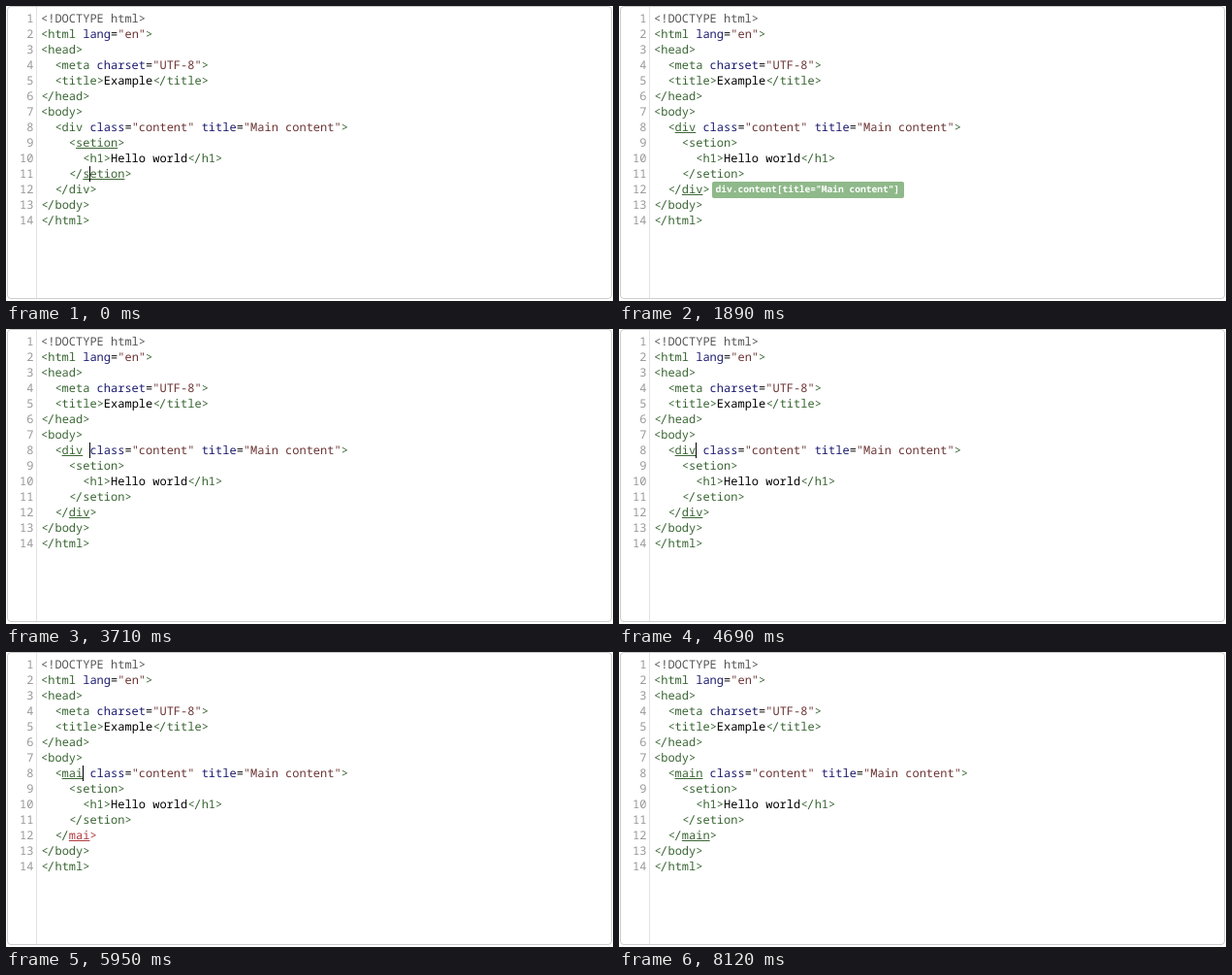
Recreate the animation shown at these times as an HTML page. Size 626 px wide and 304 px high, loop 8260 ms.

```html
<!DOCTYPE html>
<html lang="en">
<head>
<meta charset="UTF-8">
<title>Linked tag editing</title>
<style>
  html, body { margin: 0; width: 100%; height: 100%; overflow: hidden; background: #fff; }
  #editor {
    position: absolute; left: 1px; top: 0; width: 622px; height: 300px;
    border: 1px solid #ccc; border-radius: 4px; overflow: hidden;
  }
  #gutter { position: absolute; left: 29px; top: 0; height: 300px; border-left: 1px solid #e2e2e2; }
  pre, #badge {
    position: absolute; margin: 0; white-space: pre;
    font: 12px/16px "Noto Sans Mono", "DejaVu Sans Mono", monospace;
    text-rendering: geometricPrecision; font-variant-ligatures: none;
  }
  #numbers { left: 0; top: 5px; width: 28.4px; text-align: right; color: #999; }
  #code { left: 36px; top: 5px; color: #000; }
  .doctype { color: #555; }
  .tag { color: #3a6634; }
  .attr { color: #1c1c70; }
  .str { color: #6c3434; }
  .bad { color: #b03a3e; }
  .match { text-decoration: underline 1px; text-underline-offset: 1px; text-decoration-skip-ink: none; }
  .lt { position: relative; left: .4px; }
  .slash { position: relative; left: -.4px; font-family: "DejaVu Sans Mono", monospace; line-height: 0; }
  #caret { position: absolute; width: 1px; height: 16px; background: #000; }
  #badge {
    left: 96px; top: 181px; width: 198px; height: 17px; border-radius: 2px;
    box-sizing: border-box; padding-left: 3.4px; background: #8fb98a; color: #fff;
    font-size: 9.6px; font-weight: 700; line-height: 16px;
  }
</style>
</head>
<body>
<div id="editor"><div id="gutter"></div></div>
<pre id="numbers"></pre>
<pre id="code"></pre>
<div id="badge">div.content[title="Main content"]</div>
<div id="caret"></div>
<script>
const LOOP = 8260, STEP = 70, BLINK = 530;
const $ = id => document.getElementById(id);

// Each key press: time, caret line, caret column, name of the edited tag
const keys = [
  [0, 11, 7, "div"],
  [295, 12, 7, "div"],
  [2960, 11, 7, "div"],
  [3100, 10, 7, "div"],
  [3230, 9, 7, "div"],
  [3360, 8, 7, "div"],
  [4190, 8, 6, "div"],
  [5530, 8, 3, ""],
  [5600, 8, 4, "m"],
  [5740, 8, 5, "ma"],
  [5880, 8, 6, "mai"],
  [6020, 8, 7, "main"]
];

const source = name => `<!DOCTYPE html>
<html lang="en">
<head>
  <meta charset="UTF-8">
  <title>Example</title>
</head>
<body>
  <${name} class="content" title="Main content">
    <setion>
      <h1>Hello world</h1>
    </setion>
  </${name}>
</body>
</html>`.split("\n");

const span = (cls, text) => `<span class="${cls}">${text}</span>`;
const token = /(<!.*>)|<(\/?)(\w*)|( \w+)=("[^"]*")|>/g;

function highlight(line, matched, bad) {
  const tag = bad ? "bad" : "tag";
  return line.replace(token, (all, doctype, slash, name, attr, str) => {
    if (doctype) return span("doctype", "&lt;" + doctype.slice(1));
    if (attr) return span("attr", attr) + "=" + span("str", str);
    if (name === undefined) return span(tag, "&gt;");
    const open = slash ? span("tag lt", "&lt;") + span("tag slash", "/") : span("tag", "&lt;");
    return open + span(tag + (matched ? " match" : ""), name);
  });
}

let shown = "";
function draw(t) {
  const [start, row, col, name] = keys.filter(k => k[0] <= t).pop();
  const bad = t >= 5530 && t < 6090;
  const html = source(name).map((line, i) => {
    const n = i + 1;
    return highlight(line, n === row || n === 20 - row, bad && n === 12);
  }).join("\n");
  if (html !== shown) $("code").innerHTML = shown = html;

  $("badge").hidden = row !== 12;
  const caret = $("caret").style;
  caret.left = Math.round(35.8 + 7.2 * col) + "px";
  caret.top = 16 * row - 11 + "px";
  caret.visibility = Math.floor((t - start) / BLINK) % 2 ? "hidden" : "visible";
}

$("numbers").textContent = Array.from({ length: 14 }, (_, i) => i + 1).join("\n");

const begin = performance.now();
function tick() {
  const t = (performance.now() - begin) % LOOP;
  draw(Math.min(Math.floor(t / STEP) * STEP, LOOP - 2 * STEP));
  requestAnimationFrame(tick);
}
tick();
</script>
</body>
</html>
```
